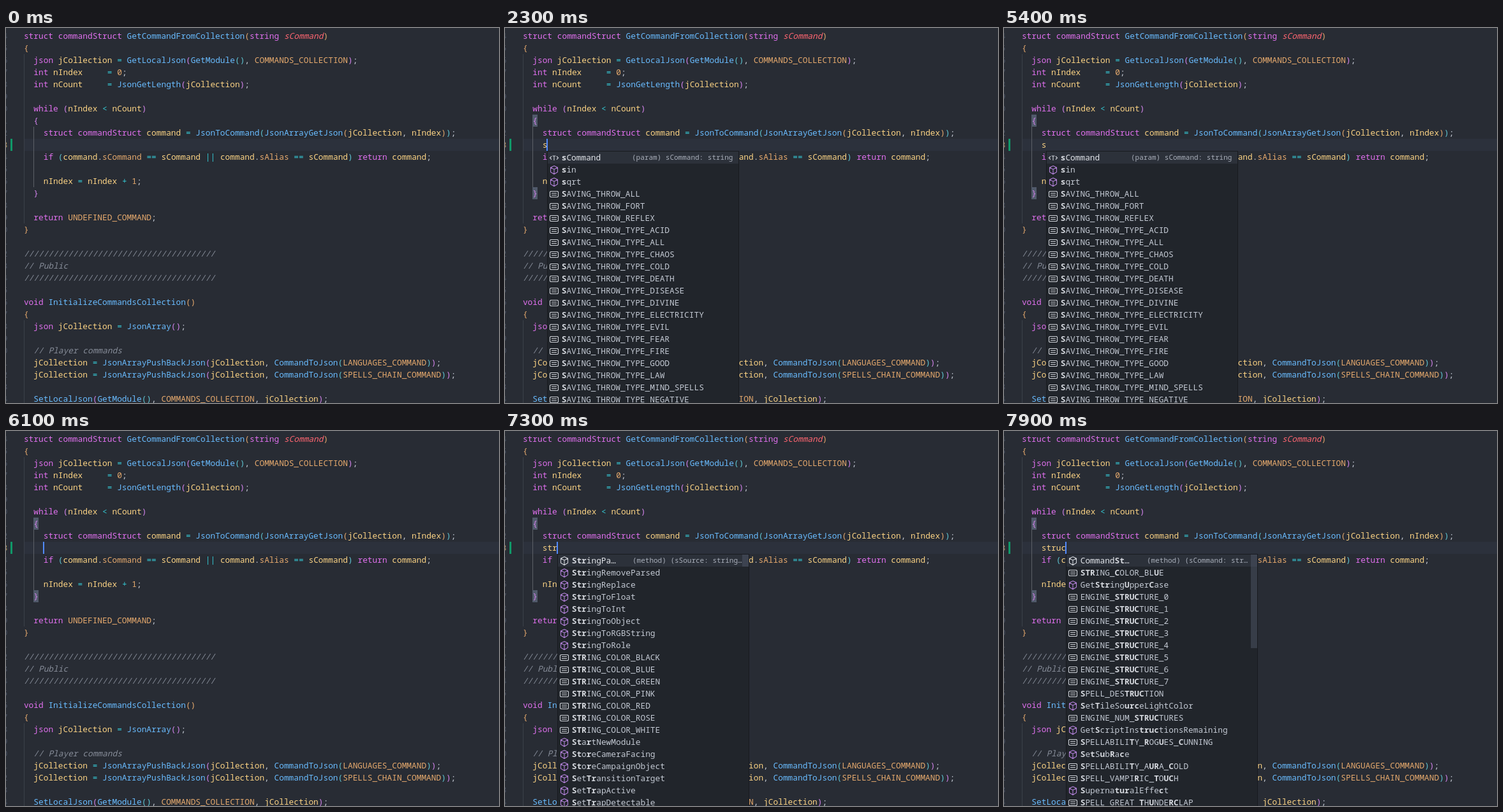
An HTML page that plays this animation: 773 by 589 pixels, repeating every 8000 ms.

```html
<!DOCTYPE html>
<html>
<head>
<meta charset="utf-8">
<style>
  html, body { margin: 0; width: 100%; height: 100%; overflow: hidden; background: #282c34; }
  svg { display: block; }
  text { font: 12.83px "Noto Sans Mono", "DejaVu Sans Mono", monospace; white-space: pre; fill: #c3c9d3; }
  .detail { font-size: 11px; fill: #a9afba; }
  .label tspan { font-weight: bold; fill: #d7dae0; }
  .icon { fill: none; stroke-width: 1.1; }
</style>
</head>
<body>
<svg id="stage" width="773" height="589" viewBox="0 0 773 589"></svg>
<script>
const CH = 7.7, ROW = 19, TOP = 3, LEFT = 27.9, CUR = 9;
const PURPLE = '#e070ee', YELLOW = '#fbd384', ORANGE = '#e5a96d', CYAN = '#35cbd6',
      BLUE = '#69bcff', RED = '#ff6671', GREY = '#c3c9d3', COMMENT = '#868c98';
const BRACKETS = [ORANGE, '#d585ee', '#5fc6d3'];

const code = `struct commandStruct GetCommandFromCollection(string sCommand)
{
  json jCollection = GetLocalJson(GetModule(), COMMANDS_COLLECTION);
  int nIndex     = 0;
  int nCount     = JsonGetLength(jCollection);

  while (nIndex < nCount)
  {
    struct commandStruct command = JsonToCommand(JsonArrayGetJson(jCollection, nIndex));

    if (command.sCommand == sCommand || command.sAlias == sCommand) return command;

    nIndex = nIndex + 1;
  }

  return UNDEFINED_COMMAND;
}

${'/'.repeat(39)}
// Public
${'/'.repeat(39)}

void InitializeCommandsCollection()
{
  json jCollection = JsonArray();

  // Player commands
  jCollection = JsonArrayPushBackJson(jCollection, CommandToJson(LANGUAGES_COMMAND));
  jCollection = JsonArrayPushBackJson(jCollection, CommandToJson(SPELLS_CHAIN_COMMAND));

  SetLocalJson(GetModule(), COMMANDS_COLLECTION, jCollection);`.split('\n');

// Square brackets mark the matched letters; the first character picks the icon.
const lists = [
  { typed: 1, detail: '(param) sCommand: string', dx: 133, bar: ROW, items: [
    't[s]Command', 'c[s]in', 'c[s]qrt',
    ...('ALL FORT REFLEX TYPE_ACID TYPE_ALL TYPE_CHAOS TYPE_COLD TYPE_DEATH TYPE_DISEASE TYPE_DIVINE ' +
      'TYPE_ELECTRICITY TYPE_EVIL TYPE_FEAR TYPE_FIRE TYPE_GOOD TYPE_LAW TYPE_MIND_SPELLS TYPE_NEGATIVE')
      .split(' ').map(s => 'e[S]AVING_THROW_' + s)] },
  { typed: 3, detail: '(method) (sSource: string…', dx: 118, bar: ROW, items: [
    ...'Pa… RemoveParsed Replace ToFloat ToInt ToObject ToRGBString ToRole'
      .split(' ').map(s => 'c[Str]ing' + s),
    ...'BLACK BLUE GREEN PINK RED ROSE WHITE'.split(' ').map(s => 'e[STR]ING_COLOR_' + s),
    'c[St]a[r]tNewModule', 'c[St]o[r]eCameraFacing', 'c[St]o[r]eCampaignObject',
    'c[S]et[Tr]ansitionTarget', 'c[S]et[Tr]apActive', 'c[S]et[Tr]apDetectable'] },
  { typed: 5, detail: '(method) (sCommand: str…', dx: 127, bar: 147, items: [
    'cCommand[St]…', 'e[STR]ING_[C]OLOR_BL[U]E', 'cGet[Str]ing[U]pper[C]ase',
    ...Array.from({ length: 8 }, (_, i) => 'eENGINE_[STRUC]TURE_' + i),
    'e[S]PELL_DES[TRUC]TION', 'c[S]et[T]ileSo[urc]eLightColor', 'eENGINE_NUM_[STRUC]TURES',
    'cGet[S]criptIns[truc]tionsRemaining', 'e[S]PELLABILI[T]Y_[R]OG[U]ES_[C]UNNING',
    'c[S]e[t]S[u]b[R]a[c]e', 'e[S]PELLABILI[T]Y_A[UR]A_[C]OLD',
    'e[S]PELL_VAMPI[R]IC_[T]O[UC]H', 'c[S]uperna[tur]alEffe[c]t', 'e[S]PELL_GREAT_[T]H[U]NDE[RC]LAP'] }
];

const icons = {
  t: 'M-4-2.5L-6.5 0L-4 2.5M4-2.5L6.5 0L4 2.5M-2.5-3H2.5M0-3V4',
  c: 'M0-6.5L5.5-3.8V3.2L0 6.5L-5.5 3.2V-3.8ZM-5.5-3.8L0-1L5.5-3.8M0-1V6.5',
  e: 'M-5.5-4.5H5.5L6.5-3.5V3.5L5.5 4.5H-5.5L-6.5 3.5V-3.5ZM-4-1.5H4M-4 1.5H4'
};

const rowY = i => TOP + ROW * i;
const rect = (x, y, w, h, fill, extra = '') =>
  `<rect x="${x}" y="${y}" width="${w}" height="${h}" fill="${fill}" ${extra}/>`;
const text = (x, y, body, extra = '') => `<text x="${x}" y="${y}" ${extra}>${body}</text>`;

let depth = 0;
function colour(tok, before, after) {
  if (tok.startsWith('//')) return COMMENT;
  if (/^[({]$/.test(tok)) return BRACKETS[depth++ % 3];
  if (/^[)}]$/.test(tok)) return BRACKETS[--depth % 3];
  if (/^(struct|commandStruct|string|json|int|while|if|return|void)$/.test(tok)) return PURPLE;
  if (/^([A-Z][A-Z_]+|\d+)$/.test(tok) || before.endsWith('.')) return ORANGE;
  if (/^\w/.test(tok)) return before.endsWith('string ') ? RED : after[0] === '(' ? BLUE : YELLOW;
  return /^[=<|+]/.test(tok) ? CYAN : GREY;
}

function paint(line) {
  return line.replace(/\/\/.*|\w+|[=|]+|\S/g, (tok, at) => {
    const c = colour(tok, line.slice(0, at), line.slice(at + tok.length));
    const slant = c === RED || c === COMMENT ? ' font-style="italic"' : '';
    return `<tspan fill="${c}"${slant}>${tok.replace('<', '&lt;')}</tspan>`;
  });
}

const caretX = n => Math.floor(27.3 + (4 + n) * CH);

function popup(list, k) {
  const x = caretX(list.typed) + 1, y = 194;
  let out = rect(x, y - 1, 301, 400, '#181a1f') + rect(x + 1, y, 299, 400, '#21252b') +
    rect(x + 1, y, 299, ROW, '#2c313a');
  list.items.forEach((item, i) => {
    const top = y + ROW * i, kind = item[0];
    const stroke = kind === 'c' && i ? '#b180d7' : '#d0d3d9';
    const label = item.slice(1).replace(/\[/g, '<tspan>').replace(/\]/g, '</tspan>');
    out += `<path class="icon" stroke="${stroke}" transform="translate(${x + 11} ${top + 10})" d="${icons[kind]}"/>` +
      text(x + 22.7, top + 14, label, `class="label"${i ? '' : ' style="fill:#e2e5ea"'}`);
  });
  out += text(x + list.dx, y + 13, list.detail, 'class="detail"') +
    rect(x + 290, y, 10, list.bar, '#4e5666', `id="bar${k}" opacity=".5"`);
  return `<g id="list${k}">${out}</g>`;
}

const guide = (x, from, to, fill) => rect(x, rowY(from), 1, ROW * (to - from), fill);
const stage = document.getElementById('stage');
stage.innerHTML =
  rect(28, rowY(CUR), 745, ROW, '#2c313c') +
  guide(28, 2, 16, '#3b4048') + guide(28, 24, 31, '#3b4048') + guide(43, 8, 13, '#5c6067') +
  rect(7, rowY(CUR), 3, ROW, '#109868') +
  '<g id="match">' + [7, 13].map(r => rect(43, rowY(r), 8, ROW, '#515a6b')).join('') + '</g>' +
  code.map((line, i) =>
    text(-5.2, rowY(i) + 14, (i + 4) % 10, `style="fill:${i === CUR ? '#b0925f' : '#495162'}"`) +
    text(LEFT, rowY(i) + 14, paint(line))).join('') +
  text(LEFT + 4 * CH, rowY(CUR) + 14, '', `id="typed" style="fill:${YELLOW}"`) +
  lists.map(popup).join('') +
  rect(0, rowY(CUR), 2, ROW, '#528bff', 'id="caret"');

// time, letters typed, open list
const steps = [[0, 0, -1], [2200, 1, -1], [2300, 1, 0], [6100, 0, -1], [6900, 1, -1],
  [7000, 1, 0], [7200, 2, 0], [7300, 3, 1], [7800, 4, 1], [7900, 5, 2]];
const blinks = [800, 1300, 1800, 2600, 3100, 3500, 4000, 4400, 4900, 5400, 5800, 6500, 6900];

const $ = id => document.getElementById(id);
const show = (id, on) => $(id).style.display = on ? '' : 'none';

function render(t) {
  const [, n, open] = steps.filter(s => s[0] <= t).pop();
  $('typed').textContent = 'struc'.slice(0, n);
  $('caret').setAttribute('x', caretX(n));
  show('caret', blinks.filter(b => b <= t).length % 2);
  show('match', t >= 800);
  lists.forEach((_, k) => {
    show('list' + k, k === open);
    show('bar' + k, t >= 7100);
  });
}

const start = performance.now();
function tick() {
  render((performance.now() - start) % 8000);
  requestAnimationFrame(tick);
}
tick();
</script>
</body>
</html>
```
